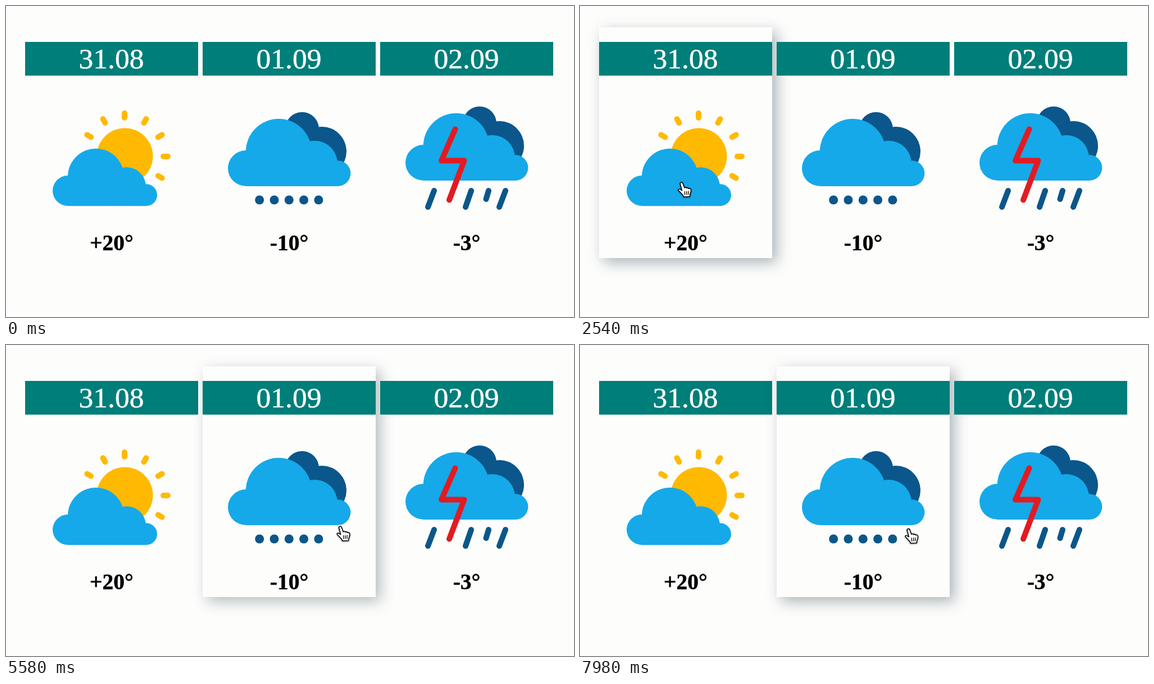
Write an HTML page that moves like this. It is 1011 px wide and 554 px high and loops after 8 s.

```html
<!DOCTYPE html>
<html lang="en">
<head>
<meta charset="utf-8">
<title>Weather cards</title>
<style>
  html, body { margin: 0; width: 100%; height: 100%; overflow: hidden; background: #fdfdfc; }
  #stage { position: relative; width: 1011px; height: 554px; overflow: hidden; }
  .card { position: absolute; top: 38px; width: 308px; height: 411px; }
  .card svg { display: block; overflow: visible; }
  text { font-family: "Liberation Serif", "Times New Roman", serif; text-anchor: middle; stroke-width: .5; }
  .date { font-size: 51.6px; fill: #fff; stroke: #fff; }
  .temp { font-size: 39.5px; font-weight: bold; fill: #000; stroke: #000; }
  .bar { fill: #007e7a; }
  .cloud { fill: #15a9e9; }
  .dark { fill: #0b568a; }
  .sun { fill: #ffb900; }
  .rays { stroke: #ffb900; }
  .rain { stroke: #0b568a; }
  .bolt { stroke: #e21b22; }
  .rays, .rain, .bolt { fill: none; stroke-width: 10; stroke-linecap: round; stroke-linejoin: round; }
  #pointer { position: absolute; left: 0; top: 0; overflow: visible; filter: drop-shadow(0 1.5px 1.5px rgba(0, 0, 0, .4)); }
</style>
</head>
<body>
<div id="stage"></div>
<svg width="0" height="0" style="position:absolute">
  <defs>
    <g id="cloud" class="cloud">
      <circle cx="27" cy="75" r="27"/>
      <circle cx="77" cy="50" r="50"/>
      <circle cx="131.5" cy="67.7" r="34.5"/>
      <circle cx="166.5" cy="82.7" r="19.5"/>
      <path d="M27 56H131L166 68V102.2H27Z"/>
    </g>
    <g id="overcast">
      <circle class="dark" cx="132" cy="18" r="30"/>
      <circle class="dark" cx="167" cy="58" r="44"/>
      <use href="#cloud" transform="scale(1.174)"/>
    </g>
  </defs>
</svg>
<script>
const LOOP = 8000, FADE = 160;
const CARD_X = 34, CARD_Y = 38, CARD_W = 308, CARD_H = 411, PITCH = 316;
const stage = document.getElementById('stage');

// Icons are drawn in stage coordinates
const rays = [30, 0, -30, -60, -90, -120, -150].map(deg =>
  `<path d="M69 0H77" transform="translate(211 268) rotate(${deg})"/>`).join('');
const dots = [0, 1, 2, 3, 4].map(i =>
  `<circle cx="${451.2 + i * 26.3}" cy="345.5" r="8"/>`).join('');

const days = [
  ['31.08', '+20°', `<circle class="sun" cx="211.5" cy="267.5" r="50"/>
    <g class="rays">${rays}</g><use href="#cloud" x="83" y="254"/>`],
  ['01.09', '-10°', `<use href="#overcast" x="395" y="201"/><g class="dark">${dots}</g>`],
  ['02.09', '-3°', `<use href="#overcast" x="711" y="191"/>
    <path class="rain" d="M762 329L751 358M828 329L818 358M859 329L854.5 344M889 329L878 358"/>
    <path class="bolt" d="M799.5 219.5L775 275.5H815.5L789 345.5"/>`]
];

const cards = days.map(([date, temp, icon], i) => {
  const x = CARD_X + i * PITCH, mid = x + CARD_W / 2;
  const card = document.createElement('div');
  card.className = 'card';
  card.style.left = x + 'px';
  card.innerHTML = `<svg width="${CARD_W}" height="${CARD_H}" viewBox="${x} ${CARD_Y} ${CARD_W} ${CARD_H}">
    <rect class="bar" x="${x}" y="64" width="${CARD_W}" height="60"/>
    <text class="date" x="${mid - 0.5}" y="111">${date}</text>${icon}
    <text class="temp" x="${mid}" y="435">${temp}</text></svg>`;
  stage.append(card);
  return card;
});

stage.insertAdjacentHTML('beforeend', `<svg id="pointer" width="30" height="34">
  <g id="hand" transform="translate(-6 -1)" stroke="#000" stroke-width="1.6" stroke-linejoin="round" stroke-linecap="round">
    <path fill="#fff" d="M4 4C3.4 1 7.6 0 8.7 2.8L11.8 11C12.5 9.4 15 9.7 15.5 11.4C16.5 10 18.6 10.6 19 12.3
      C20.5 11.3 23 12 23.3 14.5C23.8 18 22.4 20 21.5 23L21 26.5L10.3 27L9.6 25C7.3 22 5.3 20 3.6 18.2
      L1 15.5C0 13.5 2 12.3 4 13.6L7.2 15.6Z"/>
    <path fill="none" stroke-width="1.3" d="M12 17.5L12.4 23M15.3 17.3L15.6 23M18.6 17L18.6 22.8"/>
  </g>
  <path id="arrow" d="M0 0V22.5L5 17.8L8.6 26L12.6 24.3L9.1 16.3H16Z" fill="#000" stroke="#fff" stroke-width="2.4" paint-order="stroke"/>
</svg>`);
const pointer = document.getElementById('pointer');
const hand = document.getElementById('hand');
const arrow = document.getElementById('arrow');

// Pointer tip: time, x, y
const path = [
  [20, 640, 474], [400, 629, 400], [820, 618, 352], [1240, 606, 334],
  [1900, 345, 322], [2330, 170, 313], [2540, 180, 314], [3000, 362, 326],
  [3520, 667, 336], [4100, 885, 338], [4550, 950, 334], [4980, 880, 328],
  [5580, 595, 323], [6200, 345, 314], [6650, 242, 308], [6840, 249, 309],
  [7340, 390, 320], [8000, 590, 327.5]
];

function slope(k, axis) {
  const a = path[Math.max(k - 1, 0)], b = path[Math.min(k + 1, path.length - 1)];
  return (b[axis] - a[axis]) / (b[0] - a[0]);
}

// Cubic through the path points
function tip(t) {
  let k = 0;
  while (k < path.length - 2 && t >= path[k + 1][0]) k++;
  const a = path[k], b = path[k + 1], d = b[0] - a[0], u = (t - a[0]) / d;
  return [1, 2].map(axis => {
    const p = a[axis], q = b[axis], m = slope(k, axis) * d, n = slope(k + 1, axis) * d;
    return p + u * (m + u * (3 * (q - p) - 2 * m - n + u * (2 * (p - q) + m + n)));
  });
}

function hovered(t) {
  if (t < path[0][0]) return -1;
  const [x, y] = tip(t);
  if (y < CARD_Y || y > CARD_Y + CARD_H) return -1;
  return cards.findIndex((_, i) => {
    const dx = x - CARD_X - i * PITCH;
    return dx >= 3 && dx <= CARD_W;
  });
}

function draw(t) {
  const steps = 16, glow = [0, 0, 0];
  for (let s = 0; s < steps; s++) {
    const i = hovered(t - s * FADE / steps);
    if (i >= 0) glow[i] += 1 / steps;
  }
  cards.forEach((card, i) => {
    card.style.boxShadow = `8px 8px 24px rgba(34, 60, 72, ${0.38 * glow[i]})`;
  });

  const shown = t >= path[0][0];
  pointer.style.display = shown ? '' : 'none';
  if (!shown) return;
  const [x, y] = tip(t), over = hovered(t) >= 0;
  pointer.style.transform = `translate(${x}px, ${y}px)`;
  hand.style.display = over ? '' : 'none';
  arrow.style.display = over ? 'none' : '';
}

const start = performance.now();
function tick() {
  draw((performance.now() - start) % LOOP);
  requestAnimationFrame(tick);
}
draw(0);
requestAnimationFrame(tick);
</script>
</body>
</html>
```
